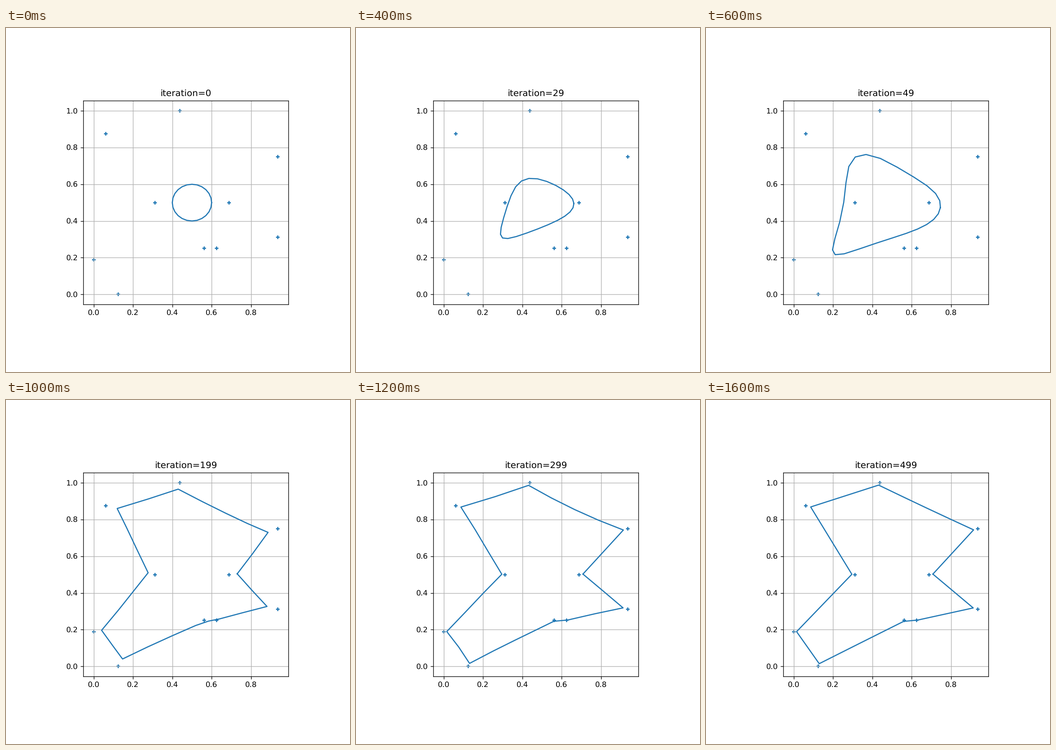
Animation, 748 px wide and 748 px high, one loop 1.8 s. Source, as a matplotlib script:

```python
import numpy as np
import matplotlib.pyplot as plt
from matplotlib.animation import FuncAnimation

STAGE = 748
INCHES = 6.4
LEFT, RIGHT, TOP, BOTTOM = 167.7, 614.2, 157.7, 601.3
ORIGIN = np.array([190.5, 579.2])     # stage position of data (0, 0)
UNIT = np.array([427.7, -399.0])      # stage pixels per data unit

CITIES = np.array([(7, 16), (1, 14), (15, 12), (5, 8), (11, 8),
                   (9, 4), (10, 4), (15, 5), (0, 3), (2, 0)]) / 16
ALPHA, BETA = 0.2, 2.0
SHOWN = [0, 9, 29, 49, 99, 199, 299, 399, 499]


def circle(radius, count):
    a = np.linspace(0, 2 * np.pi, count)
    return 0.5 + radius * np.column_stack([np.cos(a), np.sin(a)])


def step(net, k):
    """One elastic net update: cities attract the band, tension smooths it."""
    gap = CITIES[:, None] - net
    w = np.exp(-(gap ** 2).sum(-1) / (2 * k) ** 2)
    w /= w.sum(1, keepdims=True)
    pull = (w[..., None] * gap).sum(0)
    tension = np.roll(net, 1, 0) - 2 * net + np.roll(net, -1, 0)
    return net + ALPHA * pull + BETA * k * tension


def solve():
    net = circle(0.1, 25)
    bands = {0: net}
    for n in range(SHOWN[-1] + 1):
        net = step(net, max(0.2 * 0.99 ** n, 0.01))
        if n in SHOWN[1:]:
            bands[n] = net
    return bands


bands = solve()

plt.rcParams["text.hinting"] = "none"
fig = plt.figure(figsize=(INCHES, INCHES), dpi=STAGE / INCHES,
                 facecolor="white")
ax = fig.add_axes([LEFT / STAGE, 1 - BOTTOM / STAGE,
                   (RIGHT - LEFT) / STAGE, (BOTTOM - TOP) / STAGE])
low, high = (np.array([(LEFT, BOTTOM), (RIGHT, TOP)]) - ORIGIN) / UNIT

ax.scatter(*CITIES.T, s=20, marker="+", color="C0")
line, = ax.plot([], [], color="C0")
title = ax.set_title("")
ax.set_xlim(low[0], high[0])
ax.set_ylim(low[1], high[1])
ax.set_xticks(np.arange(5) * 0.2)
ax.set_yticks(np.arange(6) * 0.2)
ax.grid(True)


def draw(i):
    n = SHOWN[i]
    net = bands[n]
    line.set_data(*np.vstack([net, net[:1]]).T)
    title.set_text(f"iteration={n}")
    return line, title


anim = FuncAnimation(fig, draw, frames=len(SHOWN), interval=200,
                     repeat=True, repeat_delay=0, blit=False)
plt.show()
```
